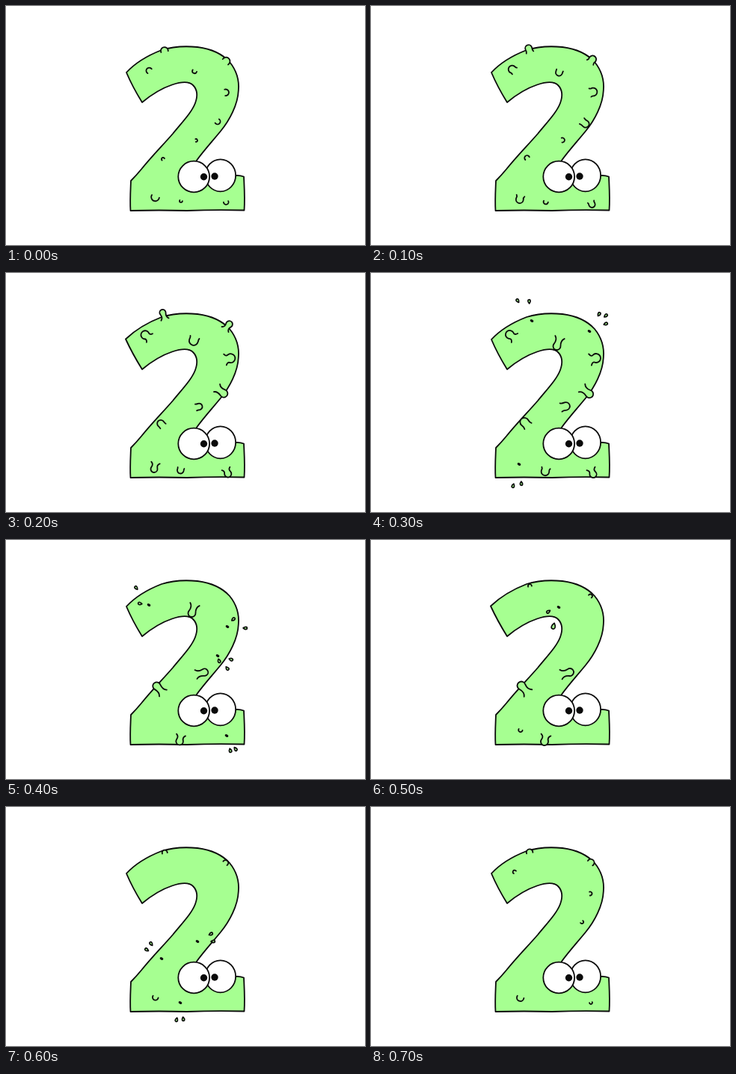
An HTML page with a canvas that plays this animation: 480 by 320 pixels, repeating every 800 ms.

```html
<!DOCTYPE html>
<html>
<head>
<meta charset="utf-8">
<style>
html, body { margin: 0; width: 100%; height: 100%; overflow: hidden; background: #fff; }
canvas { display: block; }
</style>
</head>
<body>
<canvas id="stage" width="480" height="320"></canvas>
<script>
const ctx = document.getElementById('stage').getContext('2d');
const GREEN = '#a6ff91', INK = '#0a0a0a', STEP = 100, STEPS = 8;

const outline = tip => new Path2D(`M${tip} C173 76 190 66 208 59 C222 54.5 240 53.5 256 55
  C275 57.5 290 65 299 75 C308 86 312 99 310.8 113 C310 132 299 153 287 167.5
  C276 181 264 194 254 208 L271 226 L307 227 Q313 226.5 318 228.5
  C318.6 243 319.6 258 318.5 273.5 Q280 272.5 242 274 Q205 273 166.5 274
  C165.6 260 166.5 247 167 234 Q174 227 181 218.5 C196 200 211 185 223 171
  C236 155 248 143 253 130 C257 119 256 112 250 106
  C244 100 231 102.5 222 105.5 C207 110.5 194 119 182 129 Q169 108 ${tip} Z`);
const bodies = [outline('161 89'), outline('160 88.5')];

// Growth cycles: first step, then [head scale, stretch] per step; the pop follows.
const cycles = {
  early: { start: 5, grow: [[.6, .05], [.85, .1], [1.05, .15], [1.2, .22], [1.1, .6], [1, 1]] },
  mid: { start: 7, grow: [[.42, 0], [.72, .08], [.9, .5], [1, .92], [1, 1]] },
  late: { start: 0, grow: [[.6, .1], [.9, .25], [1.2, .4], [1, 1], [1, 1]] },
  last: { start: 0, grow: [[.4, 0], [.65, .15], [.9, .35], [1.1, .55], [1, .95], [1.05, 1]] }
};

// base: root, head: fully stretched tip centre, hole: mark left by the pop
const pimples = [
  { cycle: 'early', base: [212.5, 62], head: [209.5, 53], r: 4.1, hole: [215, 64], drops: [[196, 37], [211.5, 38]] },
  { cycle: 'early', base: [293, 75.5], head: [298.5, 68.5], r: 4.4, hole: [292, 78], drops: [[305, 55], [314, 57], [314, 68]] },
  { cycle: 'early', base: [200, 254], head: [198, 262.5], r: 4.5, hole: [198, 256], drops: [[190, 285], [201, 282]] },
  { cycle: 'mid', base: [192, 87], head: [185.5, 82.5], r: 5.6, hole: [191, 87], drops: [[174, 64], [179, 85]] },
  { cycle: 'mid', base: [293, 116], head: [301, 114], r: 6, hole: [296, 116], drops: [[304, 106], [320, 118]] },
  { cycle: 'mid', base: [282, 154], head: [292, 162], r: 5.2, hole: [283, 155], drops: [[285, 162], [301, 160], [296, 172]] },
  { cycle: 'mid', base: [294, 262], head: [297, 269.5], r: 4.6, hole: [295, 262], drops: [[300, 282], [307, 280]] },
  { cycle: 'late', base: [252.5, 86], head: [248.5, 98], r: 5, hole: [251, 90], drops: [[237, 96], [244, 115.5, 1.5]] },
  { cycle: 'last', base: [254, 180], head: [266, 177], r: 4.8, hole: [256, 180], drops: [[274, 170], [277, 180]] },
  { cycle: 'last', base: [210, 205], head: [201, 195], r: 5.2, hole: [208, 203], drops: [[194, 183], [188, 191]] },
  { cycle: 'last', base: [234, 261], head: [232, 270], r: 4.8, hole: [233, 262], drops: [[228, 285], [237, 284]] }
];

function ink(path, fill) {
  ctx.fillStyle = fill;
  ctx.fill(path);
  ctx.stroke(path);
}

// Runs draw with the origin at (x, y) and "up" pointing along (dx, dy).
function aimed(x, y, dx, dy, draw) {
  ctx.save();
  ctx.translate(x, y);
  ctx.rotate(Math.atan2(dx, -dy));
  draw();
  ctx.restore();
}

function bump({ base: [bx, by], head: [hx, hy], r }, [scale, stretch]) {
  const dx = hx - bx, dy = hy - by, len = Math.hypot(dx, dy) * stretch;
  r *= scale;
  aimed(bx + dx * stretch, by + dy * stretch, dx, dy, () => {
    const p = new Path2D(), legs = len > r * .6;
    const pinch = stretch ** 2, cut = .4 * pinch;
    const foot = r * (1 + .3 * pinch), neck = r * (1 - .55 * pinch);
    if (legs) {
      p.moveTo(-foot, len);
      p.quadraticCurveTo(-neck, len * .7, -r * Math.cos(cut), r * Math.sin(cut));
    }
    p.arc(0, 0, r, Math.PI - (legs ? cut : .1), legs ? cut : .35);
    if (legs) p.quadraticCurveTo(neck, len * .7, foot, len);
    ink(p, GREEN);
  });
}

function pop({ base: [bx, by], hole: [x, y], drops }) {
  ctx.fillStyle = INK;
  ctx.beginPath();
  ctx.ellipse(x, y, 2.5, 1.7, .5, 0, 7);
  ctx.fill();
  for (const [x, y, s = 1] of drops) {
    aimed(x, y, x - bx, y - by, () => {
      ctx.scale(s, s);
      ctx.lineWidth = 1.7 / s;
      ink(new Path2D('M0 2.9 C-2.6 -.2 -1.8 -2.4 0 -2.4 C1.8 -2.4 2.6 -.2 0 2.9Z'), GREEN);
    });
  }
}

function disc(x, y, rx, ry = rx) {
  const p = new Path2D();
  p.ellipse(x, y, rx, ry, 0, 0, 7);
  return p;
}

function draw(now) {
  const step = Math.floor(now / STEP) % STEPS;
  ctx.clearRect(0, 0, 480, 320);
  ctx.lineWidth = 1.8;
  ctx.lineCap = ctx.lineJoin = 'round';
  ctx.strokeStyle = INK;
  ink(bodies[step % 3 === 2 ? 1 : 0], GREEN);

  for (const p of pimples) {
    const { start, grow } = cycles[p.cycle];
    const age = (step - start + STEPS) % STEPS;
    if (age < grow.length) bump(p, grow[age]);
    else if (age === grow.length) pop(p);
  }

  ink(disc(286.7, 226.8, 20.4, 21.5), '#fff');
  ink(disc(251.2, 228.5, 20.9, 20.8), '#fff');
  ctx.fillStyle = INK;
  ctx.fill(disc(264.5, 228.7, 4.7));
  ctx.fill(disc(279, 228, 4.7));
  requestAnimationFrame(draw);
}
requestAnimationFrame(draw);
</script>
</body>
</html>
```
